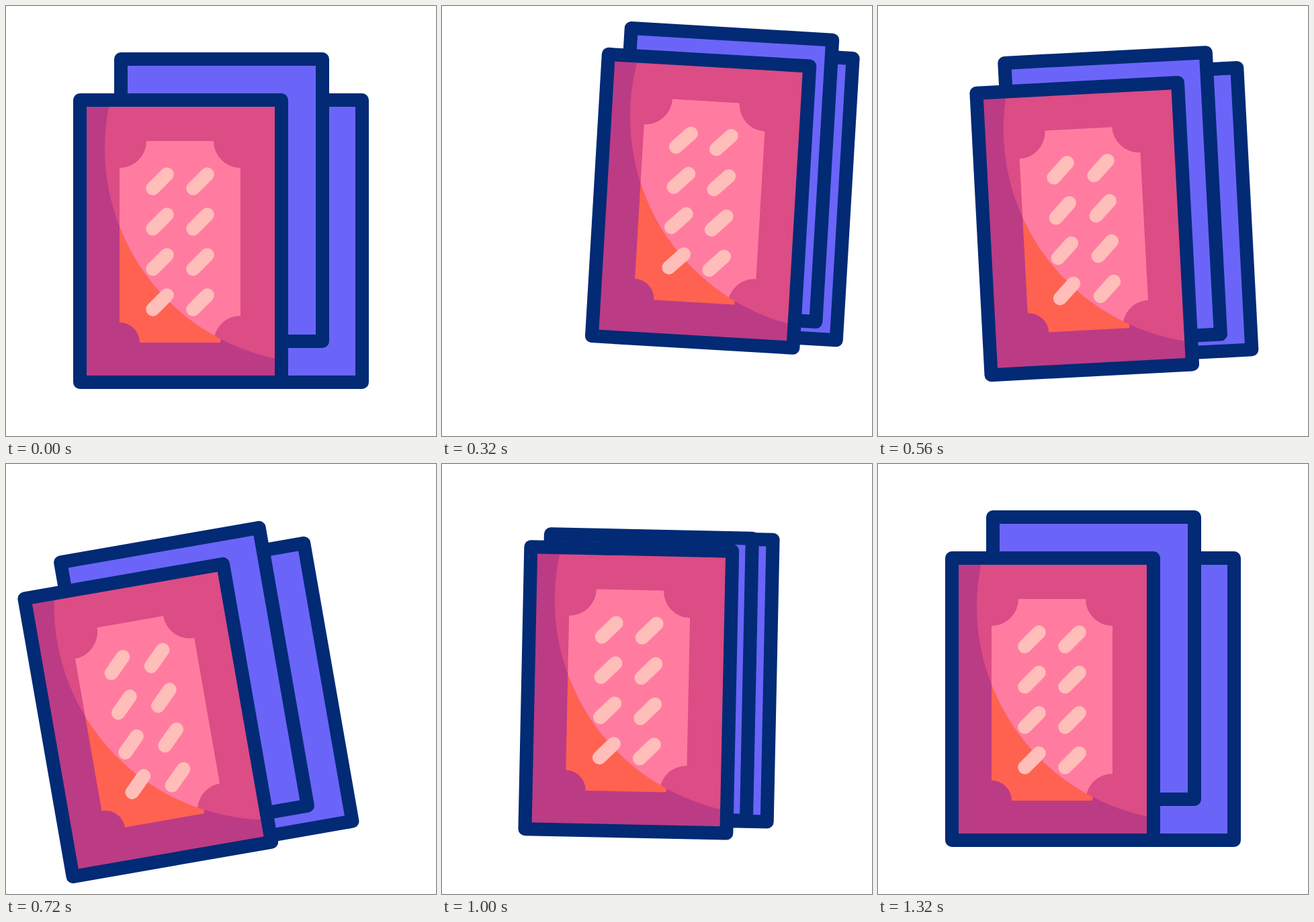
An HTML page that plays this animation: 640x640 px, repeating every 1480 ms.

```html
<!DOCTYPE html>
<html lang="en">
<head>
<meta charset="utf-8">
<title>Cards</title>
<style>
  html, body { margin: 0; width: 100%; height: 100%; overflow: hidden; background: #fff; }
  svg { display: block; width: 100%; height: 100%; }
  .frame { stroke: #022a75; stroke-width: 20; stroke-linejoin: round; }
</style>
</head>
<body>
<svg viewBox="0 0 640 640">
  <defs>
    <clipPath id="shine"><circle cx="206.5" cy="-138" r="319.5"/></clipPath>
    <rect id="card" class="frame" x="-150" y="-210" width="300" height="420"/>
  </defs>
  <use id="back" href="#card" fill="#6a65f8"/>
  <use id="middle" href="#card" fill="#6a65f8"/>
  <g id="front">
    <rect x="-150" y="-210" width="300" height="420" fill="#bc3b85"/>
    <path id="darkTicket" fill="#ff6250"/>
    <g clip-path="url(#shine)">
      <rect x="-150" y="-210" width="300" height="420" fill="#dc4c85"/>
      <path id="lightTicket" fill="#ff7ca0"/>
    </g>
    <path id="pills" stroke="#ffbeb9" stroke-width="20.5" stroke-linecap="round"/>
    <use href="#card" fill="none"/>
  </g>
</svg>
<script>
const LOOP = 1480, STEP = 40;
const times = [40, 400, 720, 1040, 1320];

// Rest centre, [dx, dy] at each key time, and the bow of the swing back.
const cards = [
  { id: 'front', rest: [260, 350], bow: [-3.4, 0.4],
    keys: [[0, 0], [143.2, -68.3], [-48.7, 31.5], [21.5, -15.7], [0, 0]] },
  { id: 'middle', rest: [321, 289], bow: [-9, 4.1],
    keys: [[0, 0], [112.2, -43], [-56, 38.5], [-9.9, 27.2], [0, 0]] },
  { id: 'back', rest: [380, 350], bow: [-5.6, 5.2],
    keys: [[0, 0], [79.5, -81.5], [-48.4, 0.6], [-40.4, -33], [0, 0]] },
];
const tilts = [0, 3.88, -9.9, 1.65, 0];
const tiltBow = 0.28;

const el = id => document.getElementById(id);

// Ticket outline with round notches of radius r.
function ticket(r) {
  const notch = (x, y) => `a${r} ${r} 0 0 0 ${x * r} ${y * r}`;
  return `M${r - 91} -149H${89 - r}${notch(1, 1)}V${151 - r}${notch(-1, 1)}` +
    `H${r - 91}${notch(-1, -1)}V${r - 149}${notch(1, -1)}Z`;
}

function pills() {
  let d = '';
  for (let i = 0; i < 8; i++)
    d += `M${-41.5 + i % 2 * 60} ${-78.5 + (i >> 1) * 60}l21 -21`;
  return d;
}

el('darkTicket').setAttribute('d', ticket(30));
el('lightTicket').setAttribute('d', ticket(40));
el('pills').setAttribute('d', pills());

function render(time) {
  const t = Math.min(Math.max(time, times[0]), times[4]);
  const i = Math.min(times.filter(k => k <= t).length, 4) - 1;
  const u = (t - times[i]) / (times[i + 1] - times[i]);
  const ease = u * u * (3 - 2 * u);
  const bend = i === 2 ? 16 * (u * (1 - u)) ** 2 : 0;
  const mix = (a, b, bow) => a + (b - a) * ease + bow * bend;

  const angle = mix(tilts[i], tilts[i + 1], tiltBow);
  for (const { id, rest, keys, bow } of cards) {
    const [x, y] = rest.map((r, k) => r + mix(keys[i][k], keys[i + 1][k], bow[k]));
    el(id).setAttribute('transform', `translate(${x} ${y}) rotate(${angle})`);
  }
}

function tick() {
  render(Math.floor(performance.now() % LOOP / STEP) * STEP);
  requestAnimationFrame(tick);
}
tick();
</script>
</body>
</html>
```
